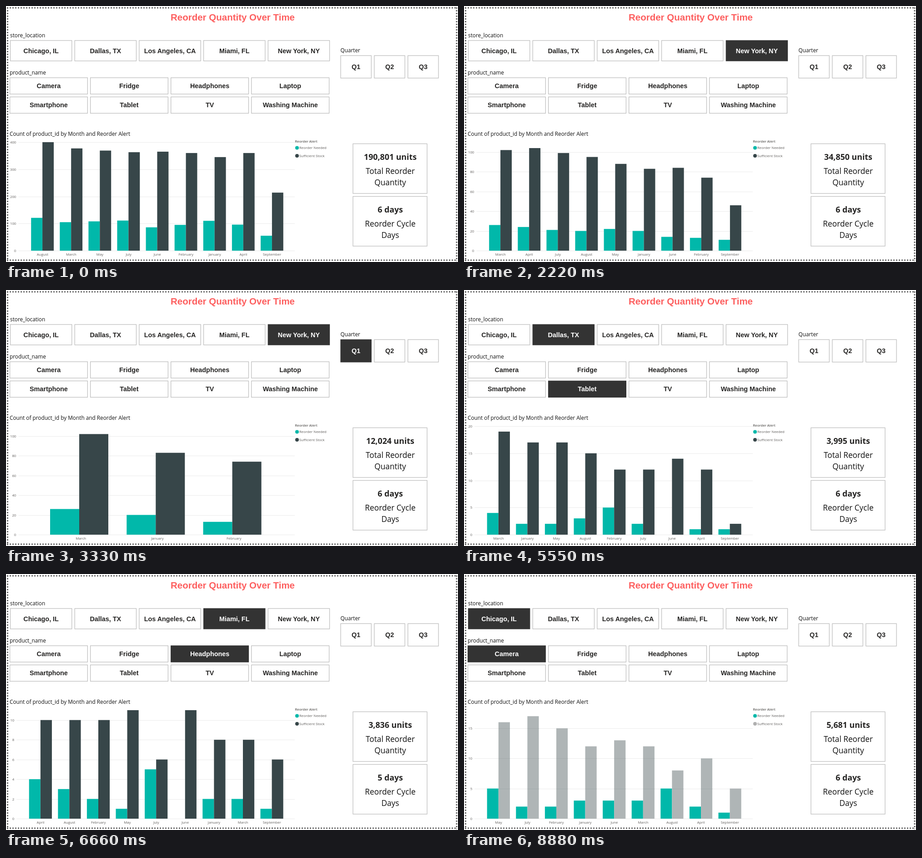
Write an HTML page that moves like this. It is 994 px wide and 564 px high and loops after 9990 ms.

```html
<!DOCTYPE html>
<html lang="en">
<head>
<meta charset="utf-8">
<title>Reorder dashboard</title>
<style>
  html, body { margin: 0; width: 100%; height: 100%; overflow: hidden; background: #fff; }
  svg { display: block; width: 994px; height: 564px; }
  text { font-family: "Open Sans", "Noto Sans", sans-serif; }
  .title, .button { font-family: "Liberation Sans", Arial, sans-serif; font-weight: 700; text-anchor: middle; }
  .title { font-size: 20.5px; fill: #fd5f5f; }
  .button { font-size: 14.4px; fill: #252423; }
  .label { font-size: 11.8px; fill: #111; }
  .value { font-size: 17.8px; font-weight: 700; fill: #252423; text-anchor: middle; }
  .caption { font-size: 17.3px; fill: #111; text-anchor: middle; }
  .small { font-size: 7.8px; fill: #605e5c; }
  .strong { font-size: 7.6px; font-weight: 600; }
  .box { fill: #fff; stroke: #bababa; stroke-width: 1.2; }
  .on .box { fill: #333; stroke: #333; }
  .on .button { fill: #fff; }
  .grid { stroke: #ebebeb; }
  .frame { stroke: #666; stroke-width: 3; stroke-dasharray: 3 3; }
</style>
</head>
<body>
<svg id="stage" viewBox="0 0 994 564"></svg>
<script>
const SLOT = 1110, TOP = 300, BASE = 539, RIGHT = 635;
const TEAL = '#01b8aa', DARK = '#374649', FADED = '#afb5b6';
const stage = document.getElementById('stage');

function add(parent, tag, attrs, content) {
  const node = document.createElementNS('http://www.w3.org/2000/svg', tag);
  for (const key in attrs) node.setAttribute(key, attrs[key]);
  if (content !== undefined) node.textContent = content;
  parent.appendChild(node);
  return node;
}
const write = (parent, cls, x, y, content, anchor) =>
  add(parent, 'text', anchor ? { class: cls, x, y, 'text-anchor': anchor } : { class: cls, x, y }, content);
const rule = (parent, cls, x1, y1, x2, y2) => add(parent, 'line', { class: cls, x1, y1, x2, y2 });

const buttons = {};
function buttonRow(names, x, y, width, height, step) {
  names.forEach((name, i) => {
    const group = add(stage, 'g', {}), left = x + i * step;
    add(group, 'rect', { class: 'box', x: left, y, width, height });
    write(group, 'button', left + width / 2, y + height / 2 + 5, name);
    buttons[name] = group;
  });
}

function card(y, lines) {
  add(stage, 'rect', { class: 'box', x: 763, y, width: 163, height: 109.5 });
  const value = write(stage, 'value', 845, y + 35.5, '');
  write(stage, 'caption', 845, y + 66.5, lines[0]);
  write(stage, 'caption', 845, y + 91.5, lines[1]);
  return value;
}

rule(stage, 'frame', 2, 4, 992, 4);
rule(stage, 'frame', 2, 560, 992, 560);
rule(stage, 'frame', 3.5, 3, 3.5, 562);
rule(stage, 'frame', 991, 3, 991, 562);
write(stage, 'title', 498.5, 31.5, 'Reorder Quantity Over Time');
write(stage, 'label', 9, 68.5, 'store_location');
write(stage, 'label', 8, 150.5, 'product_name');
write(stage, 'label', 735.5, 102, 'Quarter');
write(stage, 'label', 8, 286, 'Count of product_id by Month and Reorder Alert');
buttonRow(['Chicago, IL', 'Dallas, TX', 'Los Angeles, CA', 'Miami, FL', 'New York, NY'], 9.5, 76, 135.3, 45, 141.7);
buttonRow(['Camera', 'Fridge', 'Headphones', 'Laptop'], 8.5, 158, 170.8, 36, 177.1);
buttonRow(['Smartphone', 'Tablet', 'TV', 'Washing Machine'], 8.5, 200.3, 170.8, 36, 177.1);
buttonRow(['Q1', 'Q2', 'Q3'], 736, 109.3, 67.3, 49.5, 73.9);
const units = card(303.5, ['Total Reorder', 'Quantity']);
const days = card(419.5, ['Reorder Cycle', 'Days']);

write(stage, 'small strong', 635.5, 301, 'Reorder Alert');
add(stage, 'circle', { cx: 640, cy: 312.5, r: 4, fill: TEAL });
write(stage, 'small', 645, 315.2, 'Reorder Needed');
const stockDot = add(stage, 'circle', { cx: 640, cy: 330, r: 4 });
write(stage, 'small', 645, 332.8, 'Sufficient Stock');
const chart = add(stage, 'g', {});

// Each entry: month, reorder needed, sufficient stock.
const parse = list => list.split(', ').map(entry => {
  const [month, needed, stock] = entry.split(' ');
  return { month, needed: +needed, stock: +stock };
});
const newYork = parse('March 26 102, April 24 104, July 21 99, August 20 95, May 22 88, January 20 83, June 14 84, February 13 74, September 11 46');
const camera = {
  on: ['Chicago, IL', 'Camera'], units: '5,681', max: 18, step: 5,
  data: parse('May 5 16, July 2 17, February 2 15, January 3 12, June 3 13, March 3 12, August 5 8, April 2 10, September 1 5')
};
const states = [
  { on: [], units: '190,801', max: 400, step: 100,
    data: parse('August 121 400, March 105 377, May 108 369, July 111 363, June 86 365, February 95 360, January 110 345, April 96 360, September 55 214') },
  { on: ['Chicago, IL'], units: '38,940', max: 80, step: 20,
    data: parse('May 22 70, February 20 71, August 26 64, March 20 69, June 18 70, January 22 65, April 18 64, July 23 57, September 11 41') },
  { on: ['New York, NY'], units: '34,850', max: 110, step: 20, data: newYork },
  { on: ['New York, NY', 'Q1'], units: '12,024', max: 110, step: 20,
    data: newYork.filter(d => /January|February|March/.test(d.month)) },
  { on: ['Dallas, TX', 'Q3'], units: '10,790', max: 120, step: 20,
    data: parse('August 22 113, July 21 93, September 10 46') },
  { on: ['Dallas, TX', 'Tablet'], units: '3,995', max: 20, step: 5,
    data: parse('March 4 19, January 2 17, May 2 17, August 3 15, February 5 12, July 2 12, June 0 14, April 1 12, September 1 2') },
  { on: ['Miami, FL', 'Headphones'], units: '3,836', days: 5, max: 11, step: 2,
    data: parse('April 4 10, August 3 10, February 2 10, May 1 11, July 5 6, June 0 11, January 2 8, March 2 8, September 1 6') },
  camera,
  { ...camera, faded: true }
];

function drawChart({ data, max, step, faded }) {
  chart.replaceChildren();
  const wide = max >= 100, few = data.length === 3;
  const axisEnd = wide ? 22.3 : 18.3;
  const first = few ? 164.7 : wide ? 80.3 : 76;
  const pitch = few ? 168.3 : wide ? 63.1 : 63.6;
  const width = few ? 64 : wide ? 24.9 : 25.1;
  const yOf = value => BASE - value / max * (BASE - TOP);
  const bar = (x, value, fill) =>
    add(chart, 'rect', { x, y: yOf(value), width, height: BASE - yOf(value), fill });

  for (let tick = 0; tick <= max; tick += step) {
    const y = Math.round(yOf(tick)) + 0.5;
    rule(chart, 'grid', axisEnd + 5, y, RIGHT, y);
    write(chart, 'small', axisEnd, yOf(tick) + 3, tick, 'end');
  }
  data.forEach((d, i) => {
    const labelX = first + i * pitch, middle = labelX - (few ? 3.7 : 0.2);
    bar(middle - width, d.needed, TEAL);
    bar(middle, d.stock, faded ? FADED : DARK);
    write(chart, 'small', labelX, 550.2, d.month, 'middle');
  });
  if (faded) {
    for (let tick = step; tick <= max; tick += step) {
      const y = Math.round(yOf(tick)) + 0.5;
      data.forEach((d, i) => {
        const x = first + i * pitch;
        if (d.stock > tick) add(chart, 'line', { x1: x, x2: x + width, y1: y, y2: y, stroke: '#a4abac' });
      });
    }
  }
}

let shown = -1;
function render(time) {
  const index = Math.floor(time / SLOT) % states.length;
  if (index !== shown) {
    shown = index;
    const state = states[index];
    for (const name in buttons) buttons[name].setAttribute('class', state.on.includes(name) ? 'on' : '');
    units.textContent = state.units + ' units';
    days.textContent = (state.days || 6) + ' days';
    stockDot.setAttribute('fill', state.faded ? '#b0b0b0' : DARK);
    drawChart(state);
  }
}

const start = performance.now();
function tick() {
  render(performance.now() - start);
  requestAnimationFrame(tick);
}
tick();
</script>
</body>
</html>
```
